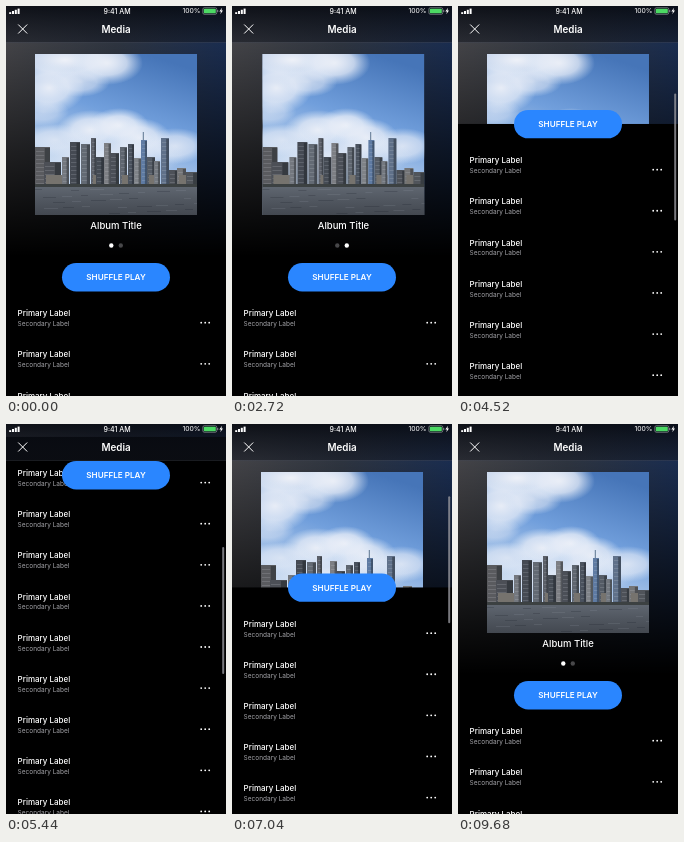
These frames come from a looping animation (220 by 390 pixels, 9720 ms). An HTML page with a canvas:

```html
<!DOCTYPE html>
<html lang="en">
<head>
<meta charset="utf-8">
<title>Media</title>
<style>
  html, body { margin: 0; width: 100%; height: 100%; overflow: hidden; background: #000; }
  canvas { display: block; width: 220px; height: 390px; }
</style>
</head>
<body>
<canvas id="stage"></canvas>
<script>
const W = 220, H = 390, LOOP = 9720;
const HEADER = 36.5, ROW = 41.1, MAX_SCROLL = 259.3;
const canvas = document.getElementById('stage');
const ratio = window.devicePixelRatio || 1;
canvas.width = W * ratio;
canvas.height = H * ratio;
const ctx = canvas.getContext('2d');
ctx.scale(ratio, ratio);

const clamp = v => Math.max(0, Math.min(1, v));
const ramp = (t, from, to) => clamp((t - from) / (to - from));

// Critically damped approach from 0 to 1; rate is per second.
function settle(t, start, rate) {
  const u = Math.max(0, t - start) / 1000 * rate;
  return 1 - (1 + u) * Math.exp(-u);
}

function rect(x, y, w, h, fill) {
  ctx.fillStyle = fill;
  ctx.fillRect(x, y, w, h);
}

function pill(x, y, w, h, r, fill) {
  ctx.fillStyle = fill;
  ctx.beginPath();
  ctx.roundRect(x, y, w, h, r);
  ctx.fill();
}

function dot(x, y, r, fill) {
  ctx.fillStyle = fill;
  ctx.beginPath();
  ctx.arc(x, y, r, 0, Math.PI * 2);
  ctx.fill();
}

// The y value is the middle of the capital letters.
function text(str, x, y, size, weight, fill, align = 'left') {
  ctx.font = `${weight} ${size}px Inter, Roboto, sans-serif`;
  ctx.textAlign = align;
  ctx.fillStyle = fill;
  ctx.fillText(str, x, y + size * 0.36);
}

function gradient(x0, y0, x1, y1, ...colors) {
  const g = ctx.createLinearGradient(x0, y0, x1, y1);
  colors.forEach((c, i) => g.addColorStop(i / (colors.length - 1), c));
  return g;
}

function cloud(x, y, rx, ry, alpha) {
  ctx.save();
  ctx.translate(x, y);
  ctx.scale(rx, ry);
  const g = ctx.createRadialGradient(0, 0, 0, 0, 0, 1);
  g.addColorStop(0, `rgba(238,241,248,${alpha})`);
  g.addColorStop(0.55, `rgba(230,236,247,${alpha * 0.8})`);
  g.addColorStop(1, 'rgba(220,232,247,0)');
  dot(0, 0, 1, g);
  ctx.restore();
}

// Clouds: x, y, radii, opacity. Towers: x, top, width, shade.
const clouds = [
  [30, 6, 62, 24, 1], [72, 9, 36, 22, .95], [14, 34, 36, 26, .95],
  [45, 28, 30, 15, .7], [8, 58, 26, 14, .5], [56, 76, 34, 20, .95],
  [84, 72, 30, 18, 1], [104, 84, 32, 20, .95], [20, 86, 34, 16, .7],
  [140, 92, 34, 18, .8], [75, 102, 75, 22, .8]
];
const towers = [
  [0, 93, 15, '#5a5b5f'], [9, 108, 17, '#4c4f56'], [27, 103, 7, '#74787f'],
  [35, 88, 10, '#454a53'], [46, 90, 9, '#636a74'], [56, 84, 5, '#5c6069'],
  [61, 103, 8, '#454b54'], [69, 89, 7, '#7d7f84'], [75, 99, 9, '#4b4f57'],
  [85, 93, 7, '#5f6670'], [93, 90, 6, '#4a525e'], [99, 104, 7, '#7f8388'],
  [106, 86, 6, '#5f7ba3'], [112, 103, 8, '#555c66'], [119, 107, 6, '#747980'],
  [126, 84, 8, '#60718a'], [134, 116, 9, '#4d5158'], [142, 114, 9, '#747577'],
  [151, 118, 11, '#50545a']
];

function photo(x, y) {
  ctx.save();
  ctx.translate(x, y);
  ctx.beginPath();
  ctx.rect(0, 0, 162, 161);
  ctx.clip();
  rect(0, 0, 162, 161, gradient(110, 0, 70, 125, '#4675b8', '#719fdc', '#c2d6ef'));
  clouds.forEach(c => cloud(...c));
  rect(107.8, 78, 1, 12, '#5d7590');
  towers.forEach(([tx, top, w, shade], i) => {
    rect(tx, top, w, 136 - top, shade);
    rect(tx + w * .65, top + 1, w * .35, 135 - top, 'rgba(20,25,32,.4)');
    for (let wy = top + 4; wy < 130; wy += 4)
      rect(tx + 1, wy, w * .55, .7, 'rgba(205,211,217,.25)');
    if (i % 4 === 1) rect(tx + 2, 121, w + 3, 13, '#76736e');
  });
  rect(0, 130, 162, 4, '#3c4142');
  rect(0, 133, 162, 28, gradient(0, 133, 0, 161, '#5f6670', '#50565f', '#434850'));
  for (let i = 0; i < 30; i++)
    rect(i * 47 % 160, 135 + i * 17 % 25, 7 + i % 9, .7,
      i % 2 ? 'rgba(160,170,182,.22)' : 'rgba(18,26,36,.28)');
  ctx.restore();
}

function backdrop() {
  rect(0, 0, W, H, gradient(0, 0, W, 0, '#47474b', '#303743', '#1b2f54'));
  rect(0, 0, W, H, gradient(0, 36, 0, 250, 'rgba(0,0,0,.05)', 'rgba(0,0,0,.55)', '#000'));
}

function albums(page) {
  for (let i = 0; i < 2; i++) {
    const x = (i - page) * W;
    if (Math.abs(x) >= W) continue;
    photo(29 + x, 48);
    text('Album Title', 110 + x, 219.4, 9.5, 500, '#fff', 'center');
  }
  const active = page > 0.5 ? 1 : 0;
  for (let i = 0; i < 2; i++)
    dot(105.3 + i * 9.5, 239.5, 2.2, i === active ? '#fff' : '#48484a');
}

function list(scroll) {
  rect(0, 271 - scroll, W, H + scroll, '#000');
  for (let i = 0; i < 15; i++) {
    const y = 307.5 + i * ROW - scroll;
    if (y > H + 10) break;
    text('Primary Label', 11.6, y, 8, 500, '#fff');
    text('Secondary Label', 11.6, y + 10.4, 6.5, 400, '#a4a4a9');
    for (let d = 0; d < 3; d++) dot(195.2 + d * 4, y + 9.2, .9, '#fff');
  }
}

function header() {
  rect(0, 0, W, HEADER, gradient(0, 0, 0, HEADER, 'rgba(7,10,17,.88)', 'rgba(19,23,33,.55)'));
  rect(0, HEADER - .5, W, .5, 'rgba(120,130,145,.35)');

  for (let i = 0; i < 4; i++) rect(3.2 + i * 2.8, 6.2 - i * 1.2, 2, 1.8 + i * 1.2, '#fff');
  text('9:41 AM', 111, 5, 7, 500, '#fff', 'center');
  text('100%', 194.5, 5, 6.8, 400, '#fff', 'right');
  ctx.strokeStyle = 'rgba(255,255,255,.6)';
  ctx.lineWidth = .6;
  ctx.beginPath();
  ctx.roundRect(196.8, 1.7, 14, 6.6, 1.6);
  ctx.stroke();
  pill(197.8, 2.7, 12, 4.6, .9, '#4cd964');
  rect(211.4, 4, .8, 2, 'rgba(255,255,255,.6)');
  ctx.fillStyle = '#fff';
  ctx.fill(new Path2D('M216 1.8L213.3 5.4H215L214.3 8.2L217 4.5H215.4Z'));

  ctx.strokeStyle = '#fff';
  ctx.lineWidth = 1;
  ctx.stroke(new Path2D('M12.2 18.5L21.2 27.5M21.2 18.5L12.2 27.5'));
  text('Media', 110, 23.4, 9.8, 600, '#fff', 'center');
}

function draw(t) {
  const page = settle(t, 1826, 8) - settle(t, 3210, 9);
  const scroll = MAX_SCROLL * (settle(t, 4190, 6) - settle(t, 6780, 7.54));
  const indicator = ramp(t, 4170, 4290) - ramp(t, 6280, 6600)
    + ramp(t, 6790, 6890) - ramp(t, 8300, 8620);

  backdrop();
  albums(page);
  list(scroll);
  const buttonY = Math.max(51.2, 271.2 - scroll);
  pill(56, buttonY - 14.2, 108, 28.4, 14.2, '#2a86ff');
  text('SHUFFLE PLAY', 110, buttonY + .2, 8.15, 600, '#fff', 'center');
  header();
  if (indicator > 0)
    pill(216.2, 36.2 + scroll * .336, 2, 127, 1, `rgba(150,150,156,${.8 * indicator})`);
}

function frame() {
  draw(performance.now() % LOOP);
  requestAnimationFrame(frame);
}
frame();
</script>
</body>
</html>
```
